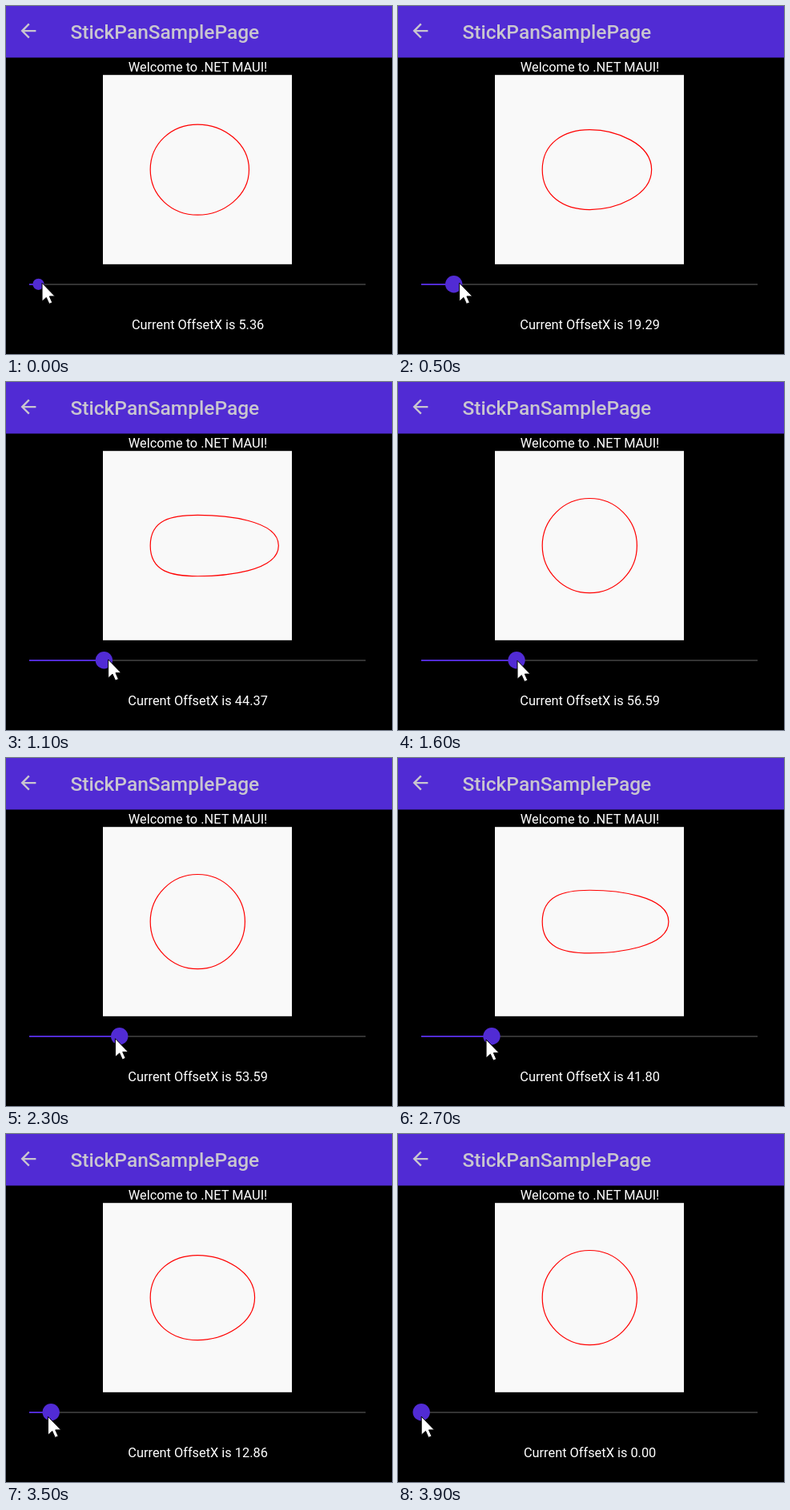
These frames come from a looping animation (482 by 435 pixels, 4 s). An HTML page:

```html
<!DOCTYPE html>
<html lang="en">
<head>
<meta charset="utf-8">
<title>StickPanSamplePage</title>
<style>
  html, body { margin: 0; width: 100%; height: 100%; overflow: hidden; background: #000; }
  svg { display: block; width: 482px; height: 435px; }
  text { font: 400 16.35px Roboto, sans-serif; fill: #fff; text-anchor: middle; }
  .title { font-size: 24.5px; font-weight: 500; fill: #c9c6cf; text-anchor: start; }
</style>
</head>
<body>
<svg viewBox="0 0 482 435">
  <rect width="482" height="435"/>
  <rect width="482" height="64.5" fill="#512bd4"/>
  <path transform="translate(13.8 16.9) scale(1.18)" fill="#c9c6cf"
        d="M20 11H7.83l5.59-5.59L12 4l-8 8 8 8 1.41-1.41L7.83 13H20z"/>
  <text class="title" x="80.5" y="41">StickPanSamplePage</text>
  <text x="239.6" y="82">Welcome to .NET MAUI!</text>
  <rect x="121" y="86.2" width="236" height="236.6" fill="#f9f9f9"/>
  <path id="blob" fill="none" stroke="#f00" stroke-width="1.2"/>
  <path d="M29 348H449" stroke="#333" stroke-width="2"/>
  <path id="fill" stroke="#512bd4" stroke-width="2"/>
  <circle id="thumb" cy="347.8" fill="#512bd4"/>
  <text id="label" x="239.6" y="404"></text>
  <path id="cursor" fill="#fff" stroke="#000" stroke-width="1"
        d="M0 0V23L5.3 18.2L8.9 26.2L12.8 24.5L9.3 16.7H16.2Z"/>
</svg>
<script>
const $ = id => document.getElementById(id);
const LOOP = 4000, STEP = 100, HOLD = 16, RESUME = 20;
const CX = 239.3, CY = 204.6, R = 59.1, K = R * 0.5523;

// Slider drag: [step, device pixels of 933]
const drag = [
  [0, 25], [5, 90], [11, 207], [HOLD, 264], [RESUME, 264],
  [25, 240], [27, 195], [31, 118], [35, 60], [39, 0]
];

function dragAt(step) {
  const i = Math.max(1, drag.findIndex(k => k[0] >= step));
  const [s0, a] = drag[i - 1], [s1, b] = drag[i];
  return Math.round(a + (b - a) * (step - s0) / (s1 - s0));
}

function smooth(p) {
  p = Math.min(1, Math.max(0, p));
  return p * p * (3 - 2 * p);
}

// Circle pulled to the right; it snaps back once the offset reaches 50
function blobPath(offset) {
  const pull = offset < 50 ? offset * 0.945 : 0;
  const top = CY - R + pull / 2, bottom = CY + R - pull / 2;
  const left = CX - R, right = CX + R + pull;
  return `M${CX} ${top}C${CX + K} ${top} ${right} ${CY - K} ${right} ${CY}` +
    `S${CX + K} ${bottom} ${CX} ${bottom}` +
    `S${left} ${CY + K} ${left} ${CY}S${CX - K} ${top} ${CX} ${top}Z`;
}

function draw(time) {
  let step = Math.floor(time % LOOP / STEP);
  if (step > HOLD && step < RESUME) step = HOLD;
  const offset = dragAt(step) * 200 / 933;
  const x = 29.2 + offset * 2.1;

  // The pointer swings ahead of the thumb, then behind it, and sinks a little
  const px = x + 7 * Math.cos(2 * Math.PI * (step - 6) / 44);
  const py = 346.2 + 7 * smooth((step - 5) / 30);

  $('blob').setAttribute('d', blobPath(offset));
  $('fill').setAttribute('d', `M29 348H${x}`);
  $('thumb').setAttribute('cx', x);
  $('thumb').setAttribute('r', step ? 10.7 : 7.1);
  $('label').textContent = `Current OffsetX is ${offset.toFixed(2)}`;
  $('cursor').setAttribute('transform', `translate(${px} ${py})`);
}

const start = performance.now();
function tick() {
  draw(performance.now() - start);
  requestAnimationFrame(tick);
}
tick();
</script>
</body>
</html>
```
